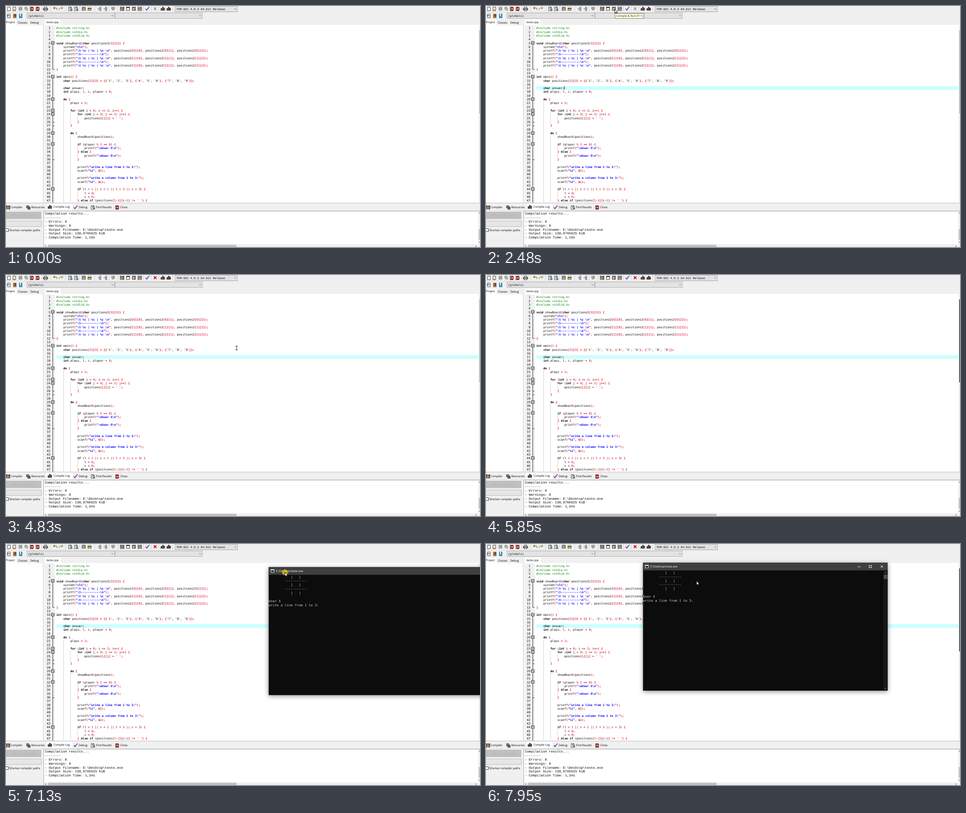
Write an HTML page with a canvas that moves like this. It is 1049 by 534 pixels and loops after 8000 ms.

```html
<!DOCTYPE html>
<html lang="en">
<head>
<meta charset="utf-8">
<style>
html, body { margin: 0; width: 100%; height: 100%; overflow: hidden; background: #f0f0f0 }
canvas { display: block }
</style>
</head>
<body>
<canvas id="stage" width="1049" height="534"></canvas>
<script>
const g = document.getElementById('stage').getContext('2d');
g.textRendering = 'geometricPrecision';
const LOOP = 8000, COL = 3.87, ROW = 8.304;
const MONO = '6.43px "DejaVu Sans Mono", monospace';
const UI = '6.25px "Open Sans", sans-serif';
const LOG = '7.4px "Liberation Mono", monospace';
const COMBO = '6.43px "Liberation Mono", monospace';
const SHELL = '7.38px "DejaVu Sans Mono", monospace';

const code = String.raw`#include <string.h>
#include <stdio.h>
#include <stdlib.h>

void showBoard(char positions2[3][3]) {
    system("cls");
    printf("\t %c | %c | %c \n", positions2[0][0], positions2[0][1], positions2[0][2]);
    printf("\t-----------\n");
    printf("\t %c | %c | %c \n", positions2[1][0], positions2[1][1], positions2[1][2]);
    printf("\t-----------\n");
    printf("\t %c | %c | %c \n", positions2[2][0], positions2[2][1], positions2[2][2]);
}

int main() {
    char positions[3][3] = {{'1', '2', '3'}, {'4', '5', '6'}, {'7', '8', '9'}};

    char answer;
    int plays, l, c, player = 0;

    do {
        plays = 1;

        for (int i = 0; i <= 2; i++) {
            for (int j = 0; j <= 2; j++) {
                positions[i][j] = ' ';
            }
        }

        do {
            showBoard(positions);

            if (player % 2 == 0) {
                printf("\nUser X\n");
            } else {
                printf("\nUser O\n");
            }

            printf("write a line from 1 to 3:");
            scanf("%i", &l);

            printf("write a column from 1 to 3:");
            scanf("%i", &c);

            if (l < 1 || c < 1 || l > 3 || c > 3) {
                l = 0;
                c = 0;
            } else if (positions[l-1][c-1] != ' ') {`.split('\n');

const results = time => String.raw`Compilation results...
--------
- Errors: 0
- Warnings: 0
- Output Filename: E:\Desktop\teste.exe
- Output Size: 130,9765625 KiB
- Compilation Time: ${time}s`.split('\n');
const compiling = String.raw`- Filename: E:\Desktop\teste.cpp
- Compiler Name: TDM-GCC 4.9.2 64-bit Release

Processing C++ source file...
--------
- C++ Compiler: C:\Program Files (x86)\Dev-Cpp\MinGW64\bin\g++.exe
- Command: g++.exe "E:\Desktop\teste.cpp" -o "E:\Desktop\teste.exe"  -I"C:\Program Files (x86)\Dev-Cpp\MinGW64\include" -I"C:\Program Files (x86)\Dev-Cpp\MinGW64\x86_64-w64-mingw32\include" -I"C:\Program Files (x86)\Dev-Cpp\MinGW64\lib"`.split('\n');
const board = ['   |   |', '-----------', '   |   |', '-----------', '   |   |'];

// Bursts of screen updates: first, last, count
const bursts = [[0, 0, 1], [70, 70, 1], [270, 390, 2], [560, 1310, 10], [1390, 2000, 8],
  [2160, 2480, 5], [2730, 3450, 9], [3820, 3820, 1], [4250, 4590, 5], [4830, 5290, 6],
  [5490, 5850, 5], [6630, 7410, 9], [7500, 7950, 6]];
const mousePath = [[70, 520, 377], [390, 480, 240], [1000, 425, 180], [1310, 422, 176],
  [2000, 285, 7], [2800, 285, 7], [3450, 313.5, 200], [4250, 313.5, 200], [4590, 400, 178],
  [5290, 722, 130], [5850, 1060, 110], [6630, 850, 108], [6727, 827, 100], [6825, 759.5, 106],
  [7312, 523, 34], [7410, 494, 35], [7680, 411, 50], [7950, 466, 82]];
const shellPath = [[6630, 764.5, 91.5], [6825, 764.5, 91.5], [7312, 459.5, 24.5],
  [7410, 430.5, 26], [7680, 347.5, 41.5]];

function snap(t) {
  const [a, b, n] = bursts.filter(s => s[0] <= t).pop();
  if (n < 2) return a;
  const d = (b - a) / (n - 1);
  return Math.min(b, a + Math.floor((t - a) / d + 1e-6) * d);
}
function along(path, t) {
  const i = path.findIndex(p => p[0] > t);
  if (i < 1) return (i ? path[path.length - 1] : path[0]).slice(1);
  const [ta, xa, ya] = path[i - 1], [tb, xb, yb] = path[i], k = (t - ta) / (tb - ta);
  return [xa + (xb - xa) * k, ya + (yb - ya) * k];
}

function rect(x, y, w, h, fill) {
  g.fillStyle = fill;
  g.fillRect(x, y, w, h);
}
function box(x, y, w, h, fill, edge) {
  rect(x, y, w, h, edge);
  rect(x + 1, y + 1, w - 2, h - 2, fill);
}
function line(color, width, ...pts) {
  g.strokeStyle = color;
  g.lineWidth = width;
  g.beginPath();
  for (let i = 0; i < pts.length; i += 2) g.lineTo(pts[i], pts[i + 1]);
  g.stroke();
}
function text(s, x, y, font = UI, color = '#000', align = 'left') {
  g.font = font;
  g.fillStyle = color;
  g.textAlign = align;
  g.fillText(s, x, y + 2.3);
}
function chevron(x, y, dx, dy, color = '#444') {
  if (dy) line(color, .9, x - 2, y - dy, x, y + dy, x + 2, y - dy);
  else line(color, .9, x - dx, y - 2, x + dx, y, x - dx, y + 2);
}

// Toolbar icons, centred on x, y
function page(x, y, fill = '#fff', edge = '#444') { box(x - 3, y - 4, 7, 9, fill, edge); }
function tiles(x, y, colors) {
  colors.forEach((c, i) => box(x - 4.5 + i % 2 * 5, y - 4 + (i >> 1) * 4.5, 4, 4, c, '#333'));
}
function pane(x, y, top, fill) {
  box(x - 4, y - 4, 8, 8, fill, '#333');
  rect(x - 4, y - 4, 8, 2.5, top);
}
function chart(x, y, colors) {
  colors.forEach((c, i) => box(x - 4.5 + i * 3, y + 1 - [2, 5, 3][i], 3, 3 + [2, 5, 3][i], c, '#222'));
}
function tick(x, y, color) { line(color, 1.8, x - 4, y, x - 1.5, y + 3, x + 4, y - 4); }
function cross(x, y, color, r = 3) {
  line(color, 2, x - r, y - r, x + r, y + r);
  line(color, 2, x + r, y - r, x - r, y + r);
}
function lens(x, y) {
  page(x - 1, y);
  g.beginPath();
  g.arc(x + 1.5, y, 2.3, 0, 7);
  g.fillStyle = '#a8e0e8';
  g.fill();
  g.strokeStyle = '#234';
  g.lineWidth = 1;
  g.stroke();
  line('#234', 1.4, x + 3, y + 2, x + 5, y + 4);
}
function turn(x, y, d, color) {
  line(color, 1.3, x + 4 * d, y + 3, x + 4 * d, y, x + 2 * d, y - 1.5, x - 3 * d, y - 1.5);
  line(color, 1.3, x - d, y - 4, x - 4 * d, y - 1.5, x - d, y + 1);
}
function closer(x, y) {
  page(x - 1, y, '#c4bcbc', '#333');
  rect(x - 2, y - 3, 6, 7, '#c01818');
  cross(x + 1, y + .5, '#f3d0d0', 1);
}

function toolbar(busy, running) {
  const y = 6, grey = '#a0a0a0';
  page(6, y);
  page(18, y);
  line('#d9a31c', 2, 17, 8, 22, 10);
  rect(28, 2, 8, 8, grey);
  rect(41, 2, 6, 6, grey);
  rect(43, 4, 6, 6, '#b0b0b0');
  closer(57, y);
  closer(70, y);
  box(84, 2, 7, 4, '#fff', '#333');
  box(82, 5, 11, 4, '#aaa', '#333');
  box(84, 7, 7, 4, '#fff', '#333');
  turn(109, y, 1, '#9a6a1a');
  turn(122, y, -1, '#8b9a62');
  lens(142, y);
  lens(155, y);
  pane(172, y, '#3f70a8', '#f5d98a');
  rect(169, 6, 6, 1, '#333');
  pane(185, y, '#e8b640', '#fff');
  rect(181, 5, 8, 2, '#333');
  for (const x of [207, 220]) {
    rect(x - 1, 2, 5, 9, grey);
    line(grey, 2, x - 4, 6, x, 6);
  }
  rect(233, 2, 8, 6, grey);
  rect(235, 8, 4, 2, grey);
  if (busy) for (const x of [257, 270, 283, 296]) rect(x - 4.5, 2, 9, 8, grey);
  else {
    tiles(257, y, ['#e8a33a', '#d8583a', '#f3d26a', '#b98333']);
    pane(270, y, '#333', '#fff');
    pane(283, y, '#2c5d94', '#f0b848');
    rect(284, 6, 3, 3, '#c84830');
    tiles(296, y, ['#eee', '#b7d3e6', '#dde8c0', '#fff']);
  }
  tick(313, y, busy ? grey : '#5a3ba5');
  cross(330, y, running ? '#d01414' : grey);
  if (busy) {
    chart(347, y, [grey, grey, grey]);
    chart(360, y, [grey, grey, grey]);
  } else {
    chart(347, y, ['#c43', '#38c', '#38a050']);
    chart(360, y, ['#d22', '#d22', '#a11']);
  }
  for (const x of [79, 98, 131, 163, 196, 228, 247, 304, 321, 338, 369]) rect(x, 1, 1, 11, '#d2d2d2');
  rect(0, 13, 515, 1, '#dcdcdc');
  page(6, 21.5);
  line('#333', 1.4, 2, 21.5, 8, 21.5);
  page(19, 21.5, '#e59a2c');
  rect(18, 19, 4, 5, '#a33b1a');
  page(32, 21.5, '#4ba8dc', '#17578a');
  rect(31, 18, 2, 4, '#fff');
  for (const [x, top, w, label] of [[374, 0, 139, 'TDM-GCC 4.9.2 64-bit Release'], [46, 15, 195, '(globals)'], [241, 15, 194, '']]) {
    box(x, top, w, 13, '#e3e3e3', '#b0b0b0');
    text(label, x + 3, top + 6.5, COMBO);
    chevron(x + w - 5.5, top + 6.5, 0, 1);
  }
}

const tokens = /(#.*)|("[^"]*")|('[^']*')|\b(void|char|int|do|for|if|else)\b|\b(\d+)\b|(\w+)|([^\s\w]+?)/g;
const styles = [null, ['#008000'], ['#0000ff', 1], ['#000'], ['#000', 1], ['#800080'], ['#000'], ['#ff0000', 1]];

function editor(lit, caret, darkThumb) {
  rect(0, 30, 23, 13, '#fff');
  rect(0, 43, 82, 393, '#fff');
  rect(82, 43, 1, 393, '#d0d0d0');
  text('Project', -.5, 36);
  text('Classes', 26, 37);
  text('Debug', 53.5, 37);
  rect(86, 30, 35, 13, '#fff');
  text('teste.cpp', 89.5, 36);
  rect(85, 42, 964, 394, '#fff');
  rect(86, 43, 22, 393, '#f0f0f0');
  if (lit) rect(111, 49 + 15.5 * ROW, 936, ROW, '#ccffff');
  line('#333', 1, 103.5, 82, 103.5, 140.5, 107, 140.5);
  line('#333', 1, 103.5, 157, 103.5, 436);
  code.forEach((src, i) => {
    const y = 49 + i * ROW, n = i + 1, indent = src.search(/\S/);
    text(n, 98, y, MONO, '#000', 'right');
    if ([26, 27, 36].includes(n)) rect(103, Math.round(y), 4, 1, '#333');
    if ([5, 14, 20, 23, 24, 29, 32, 44].includes(n)) {
      box(100, Math.round(y) - 4, 7, 7, '#fff', '#222');
      rect(101.5, Math.round(y) - 1, 4, 1, '#222');
    }
    const next = code.slice(i).find(s => s) || '';
    const depth = indent < 0 ? next.search(/\S/) : indent;
    for (let c = 4; c < depth; c += 4) rect(Math.round(111.5 + c * COL), y - 4.2, 1, ROW, '#d0d0d0');
    for (const m of src.matchAll(tokens)) {
      const [color, bold] = styles[m.findIndex((v, k) => k && v !== undefined)];
      text(m[0], 111.5 + m.index * COL, y, (bold ? 'bold ' : '') + MONO, color);
    }
  });
  if (caret) rect(173, 178, 1, 7, '#000');
  rect(1046, 43, 3, 393, '#f0f0f0');
  rect(1047, 54, 2, 184, darkThumb ? '#606060' : '#c4c4c4');
}

function bottom(busy, lines, scroll) {
  rect(0, 436, 1049, 98, '#f0f0f0');
  rect(0, 436, 1049, 1, '#bdbdbd');
  rect(90, 438, 57, 16, '#fff');
  tiles(4.5, 446, ['#e8a33a', '#d8583a', '#f3d26a', '#b98333']);
  box(45, 442, 6, 6, '#5a8', '#333');
  box(48, 445, 6, 6, '#85a', '#333');
  chart(97, 445, ['#c43', '#38c', '#38a050']);
  tick(154, 446, '#5a3ba5');
  lens(192, 446);
  closer(246, 446);
  [['Compiler', 10], ['Resources', 56], ['Compile Log', 105], ['Debug', 161], ['Find Results', 199], ['Close', 253]]
    .forEach(([s, x], i) => text(s, x, i === 2 ? 445 : 446));
  rect(0, 453, 1049, 1, '#dcdcdc');
  if (busy) box(-1, 456, 79, 16, '#e1e1e1', '#adadad');
  else {
    box(-1, 456, 79, 16, '#c0c0c0', '#b8b8b8');
    text('Abort Compilation', 39.5, 464.9, UI, '#d8d8d8', 'center');
  }
  text('Abort Compilation', 39, 464.4, UI, busy ? '#000' : '#a0a0a0', 'center');
  box(-1, 476, 80, 13, '#e6e6e6', '#bcbcbc');
  box(-1, 493, 7, 7, '#fff', '#333');
  text('Shorten compiler paths', 7.5, 497);
  box(83, 454, 968, 82, '#fff', '#a5a8ae');
  g.save();
  g.beginPath();
  g.rect(84, 455, 960, 72);
  g.clip();
  lines.forEach((s, i) => text(s, 86, 459.8 + i * 8.87, LOG));
  g.restore();
  rect(84, 528, 965, 6, '#f0f0f0');
  rect(93, 529, 417, 5, '#c1c1c1');
  chevron(88, 532, -1, 0);
  chevron(1040, 532, 1, 0);
  rect(1045, 455, 4, 73, '#f0f0f0');
  rect(1046, scroll, 3, busy ? 38 : 24, '#c8c8c8');
  chevron(1048, 459, 0, -1);
  chevron(1048, 523, 0, 1);
}

function shell(x, y, caret) {
  g.save();
  g.translate(x, y);
  g.shadowColor = 'rgba(0,0,0,.45)';
  g.shadowBlur = 10;
  g.shadowOffsetY = 2;
  rect(0, 0, 541.5, 283.5, '#0c0c0c');
  g.shadowColor = 'transparent';
  rect(0, 0, 541.5, 17, '#3f3f3f');
  box(4.5, 5, 8, 7, '#222', '#eee');
  rect(4.5, 5, 8, 2, '#eee');
  text('E:\\Desktop\\teste.exe', 16, 8.5, UI, '#fff');
  rect(475, 8.5, 6, 1, '#fff');
  g.strokeStyle = '#fff';
  g.lineWidth = 1;
  g.strokeRect(500.5, 6, 5, 5);
  line('#fff', 1, 526, 6, 531, 11);
  line('#fff', 1, 531, 6, 526, 11);
  board.forEach((s, i) => text(s, 35.5, 22 + i * 8.87, SHELL, '#ccc'));
  text('User X', 0, 75.2, SHELL, '#ccc');
  text('write a line from 1 to 3:', 0, 84.1, SHELL, '#ccc');
  if (caret) rect(111, 86, 4.5, 1.5, '#eee');
  rect(532, 17, 9.5, 266, '#171717');
  rect(532.5, 26.5, 8.5, 9.5, '#4d4d4d');
  chevron(536.5, 22, 0, -1, '#999');
  chevron(536.5, 278.5, 0, 1, '#999');
  g.restore();
}

const arrow = new Path2D('M0 0V8.7L2 6.9L3.3 9.8L4.7 9.2L3.4 6.4H6.2Z');
function pointer(x, y, ibeam, pressed) {
  if (pressed) {
    g.beginPath();
    g.arc(x, y, 6.5, 0, 7);
    g.fillStyle = 'rgba(236,196,20,.75)';
    g.fill();
  }
  if (ibeam) {
    line('#222', 1, x, y - 4, x, y + 4.5);
    for (const dy of [-4, 4.5]) line('#222', 1, x - 2.5, y + dy, x + 2.5, y + dy);
    return;
  }
  g.save();
  g.translate(x, y);
  g.fillStyle = '#fff';
  g.fill(arrow);
  g.strokeStyle = '#000';
  g.lineWidth = .9;
  g.stroke(arrow);
  g.restore();
}

function draw(now) {
  const t = now % LOOP, s = snap(t);
  const within = (a, b) => s >= a && s < b;
  const busy = within(2815, 4830), logBusy = within(2815, 4560);
  const caretOn = t >= 1170 && t < 4830 && Math.floor((t - 1170) / 530) % 2 === 0;
  rect(0, 0, 1049, 534, '#f0f0f0');
  toolbar(busy, s >= 4830);
  editor(s >= 1140, caretOn, s >= 5760);
  bottom(busy, logBusy ? compiling : results(s < 2815 ? '1,19' : '1,34'), logBusy ? 475 : 494);
  if (s >= 6630) shell(...along(shellPath, s), s < 7100);
  if (within(2400, 2730)) {
    box(285, 16, 65, 12, '#ffffe1', '#767676');
    text('Compile & Run (F11)', 317.5, 21.8, UI, '#222', 'center');
  }
  if (within(70, 5850) || s >= 6630) {
    const [x, y] = along(mousePath, s);
    const pressed = within(1140, 1230) || within(2730, 2900) || within(6720, 7760);
    pointer(x, y, s < 6630 && x > 110 && x < 1046 && y > 43 && y < 436, pressed);
  }
}
function frame() {
  draw(performance.now());
  requestAnimationFrame(frame);
}
frame();
</script>
</body>
</html>
```
